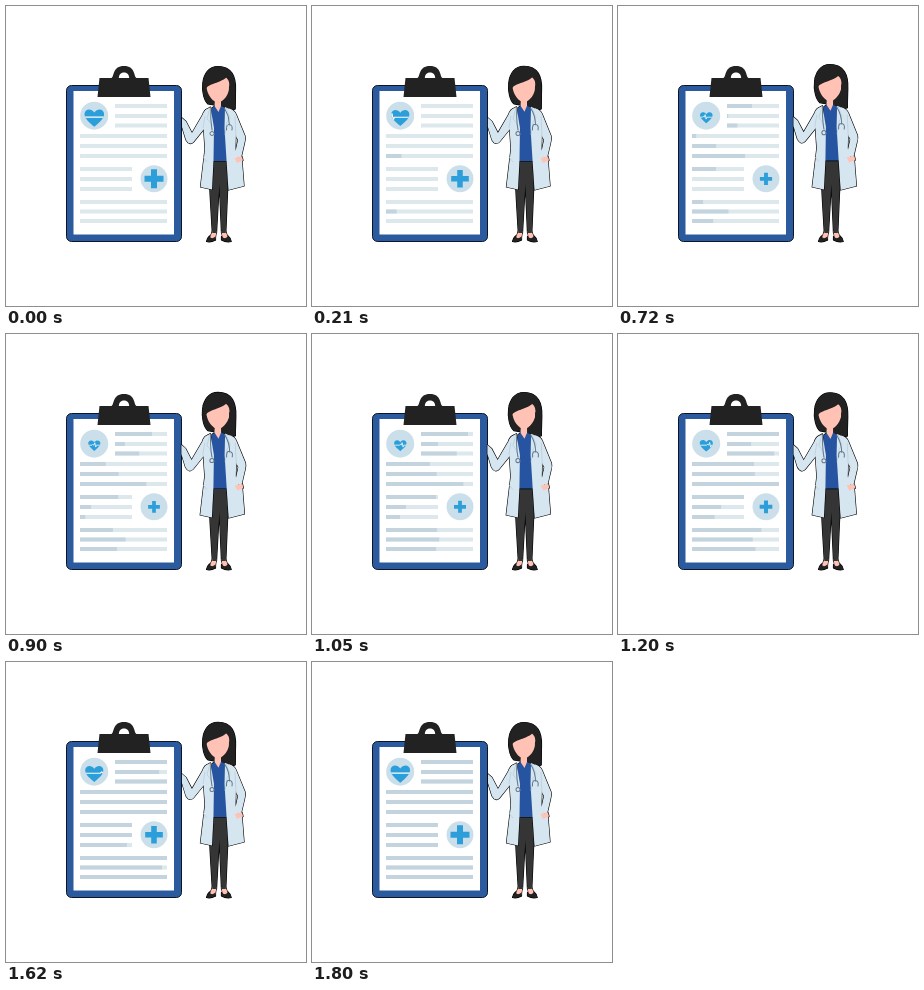
Animation, 300 px wide and 300 px high, one loop 1830 ms. Source, as an HTML page without scripts:

```html
<!DOCTYPE html>
<html lang="en">
<head>
<meta charset="utf-8">
<title>Doctor with clipboard</title>
<style>
html, body { margin: 0; width: 100%; height: 100%; overflow: hidden; background: #fff; }
svg { display: block; width: 100vw; height: 100vh; }
.bars { fill: none; stroke: #dde8ec; stroke-width: 4; }
.fill { fill: #c3d4df; }
.ink { fill: #222; }
.skin { fill: #ffc2b4; }
.coat { fill: #d6e6f0; }
.rim { stroke: #000; stroke-width: 1.2; stroke-linejoin: round; }
.fold { fill: none; stroke: #b4cbd9; stroke-width: .7; }
.tube { fill: none; stroke: #60778e; stroke-width: 1; stroke-linecap: round; }
.icon { fill: #2c9fda; }
.disc { fill: #cbdfea; }
</style>
</head>
<body>
<svg viewBox="0 0 300 300">
  <defs>
    <path id="heart" d="M0 9.5C-4 6-9.800 1.500-9.800-3C-9.800-8.300-3.200-9.600 0-4.700C3.200-9.600 9.800-8.300 9.800-3C9.800 1.500 4 6 0 9.500Z"/>
    <clipPath id="heartClip"><use href="#heart"/></clipPath>

    <g id="legs">
      <path class="skin" d="M206.500 225H210.500L209 234H203ZM215.500 225H219.500L223 234H217Z"/>
      <path d="M203 152H223L221.500 187L219.800 227H215.500L213.300 178L210.500 227H206.300L204 187Z" fill="#353535"/>
      <path class="ink" d="M203.500 230Q205 234 209.500 230.500V234Q205 236.500 200.500 235.500Q201 232.500 203.500 230ZM215.500 230.500Q219.500 234 222 230Q225 232.500 225.200 235.500Q220 236.500 215.500 234Z"/>
    </g>

    <g id="body">
      <path class="ink" d="M202 98C194 91 193 60.500 212 60.500C226 60.500 230 71 229.500 84L229 103Q224 104.500 219 101Z"/>
      <path d="M206 102L209 100H215L220 102L221 155H205Z" fill="#2654a0"/>
      <path class="skin" d="M209 92H215V100L212.500 106L208.500 100Z"/>
      <path class="skin" d="M200.500 80C201 67 223 65 223.500 79C224 88 217 96.500 212 96.500C207 96.500 200.500 88 200.500 80Z"/>
      <path class="ink" d="M199.500 84C201 77 215 78 222.500 69.500Q224 75 223.500 83L228 76L221 64H204L197.500 73Z"/>
      <path class="ink" d="M223 80L229 78L229 103Q224 104.500 220 101Q223 92 223 80Z"/>

      <path class="coat" d="M202 102.500Q198 104 196.500 109L186 127L180 115.500L176 112V121L180 134Q183.500 140 187.500 136L198 123Z"/>
      <path class="coat" d="M223 102.500Q228.500 104 230 108L239 130Q239.800 133 238.500 137L235 152L228.500 150L232 134L225 121Z"/>
      <path class="coat" d="M204.500 101L199 104.500L197.500 121L199 143L194.500 181L206 183.500L207.500 154L208 122Z"/>
      <path class="coat" d="M219 101L227 104.500L230 124L229.500 143L231 150L236 155L238 180L222.500 184L220.500 154L218.500 122Z"/>
      <path class="skin" d="M228.500 152L236 150.500L237 154.500L231 157Z"/>
    </g>
  </defs>

  <!-- clipboard -->
  <rect x="60.500" y="79.500" width="115" height="156" rx="5" fill="#2b5a9e" stroke="#0d1524" stroke-width="1"/>
  <rect x="67.500" y="85" width="100.500" height="143.500" fill="#fff"/>
  <path class="ink" d="M91.500 91L93.500 72H105.500C108.500 70 106.500 60 118 60C129.500 60 127.500 70 130.500 72H142.500L144.500 91Z"/>
  <path d="M112.800 72C113 64.800 123 64.800 123.200 72Z" fill="#fff"/>

  <!-- text bars -->
  <path class="bars" d="M109 100h52M109 110h52M109 119.500h52M74 130h87M74 140h87M74 150h87M74 163h52M74 173h52M74 183h52M74 196h87M74 205.500h87M74 215h87"/>
  <g class="fill">
    <rect x="109" y="98" width="0" height="4"><animate attributeName="width" values="0;0;52;52" keyTimes="0;.188;.615;1" dur="1.83s" repeatCount="indefinite"/></rect>
    <rect x="109" y="108" width="0" height="4"><animate attributeName="width" values="0;0;52;52" keyTimes="0;.38;.975;1" dur="1.83s" repeatCount="indefinite"/></rect>
    <rect x="109" y="117.500" width="0" height="4"><animate attributeName="width" values="0;0;52;52" keyTimes="0;.32;.69;1" dur="1.83s" repeatCount="indefinite"/></rect>
    <rect x="74" y="128" width="0" height="4"><animate attributeName="width" values="0;0;87;87" keyTimes="0;.375;.77;1" dur="1.83s" repeatCount="indefinite"/></rect>
    <rect x="74" y="138" width="0" height="4"><animate attributeName="width" values="0;0;87;87" keyTimes="0;.23;.82;1" dur="1.83s" repeatCount="indefinite"/></rect>
    <rect x="74" y="148" width="0" height="4"><animate attributeName="width" values="0;87;87" keyTimes="0;.645;1" dur="1.83s" repeatCount="indefinite"/></rect>
    <rect x="74" y="161" width="0" height="4"><animate attributeName="width" values="0;0;52;52" keyTimes="0;.227;.588;1" dur="1.83s" repeatCount="indefinite"/></rect>
    <rect x="74" y="171" width="0" height="4"><animate attributeName="width" values="0;0;52;52" keyTimes="0;.394;.863;1" dur="1.83s" repeatCount="indefinite"/></rect>
    <rect x="74" y="181" width="0" height="4"><animate attributeName="width" values="0;0;52;52" keyTimes="0;.443;.934;1" dur="1.83s" repeatCount="indefinite"/></rect>
    <rect x="74" y="194" width="0" height="4"><animate attributeName="width" values="0;0;87;87" keyTimes="0;.344;.736;1" dur="1.83s" repeatCount="indefinite"/></rect>
    <rect x="74" y="203.500" width="0" height="4"><animate attributeName="width" values="0;87;87" keyTimes="0;.94;1" dur="1.83s" repeatCount="indefinite"/></rect>
    <rect x="74" y="213" width="0" height="4"><animate attributeName="width" values="0;0;87;87" keyTimes="0;.262;.803;1" dur="1.83s" repeatCount="indefinite"/></rect>
  </g>

  <!-- pulsing icons -->
  <circle class="disc" cx="88.200" cy="109.700" r="14"/>
  <g transform="translate(88.300 111.200)">
    <g>
      <animateTransform attributeName="transform" type="scale" values="1;.62;1" keyTimes="0;.5;1" calcMode="spline" keySplines=".3 0 .45 1;.55 0 .7 1" dur="1.83s" repeatCount="indefinite"/>
      <use href="#heart" class="icon"/>
      <g clip-path="url(#heartClip)">
        <path d="M-40 0H-3.500L-2-1.500L-.5 0L1-4L2.500 3L3.500 0H40" fill="none" stroke="#fff" stroke-width="1.200" stroke-linejoin="round">
          <animateTransform attributeName="transform" type="translate" values="-13 0;13 0" dur="1.83s" repeatCount="indefinite"/>
        </path>
      </g>
    </g>
  </g>
  <circle class="disc" cx="148" cy="172.800" r="13.500"/>
  <g transform="translate(148 172.800)">
    <path class="icon" d="M-3-9.500H3V-3H9.500V3H3V9.500H-3V3H-9.500V-3H-3Z">
      <animateTransform attributeName="transform" type="scale" values="1;.62;1" keyTimes="0;.5;1" calcMode="spline" keySplines=".3 0 .45 1;.55 0 .7 1" dur="1.83s" repeatCount="indefinite"/>
    </path>
  </g>

  <!-- doctor: dark rim below, shapes above -->
  <use href="#legs" class="rim"/>
  <use href="#legs"/>
  <g transform="translate(212 184)">
    <g>
      <animateTransform attributeName="transform" type="scale" values="1;1.017;1" keyTimes="0;.5;1" calcMode="spline" keySplines=".4 0 .6 1;.4 0 .6 1" dur="1.83s" repeatCount="indefinite"/>
      <g transform="translate(-212 -184)">
        <use href="#body" class="rim"/>
        <use href="#body"/>
        <path class="fold" d="M204 102L201 113L204 116L208 129M220 102L224 112L221 116L219 129M197 151L201 156M229 110L230 132M199 110L197 122"/>
        <path class="tube" d="M205 102Q204 112 206 124M218.500 102Q223.500 110 223.500 119M220.500 124Q220 118 223.500 118.500Q227 119 226 124"/>
        <circle cx="206" cy="127.500" r="2" fill="#dce6ec" stroke="#60778e"/>
      </g>
    </g>
  </g>
</svg>
</body>
</html>
```
